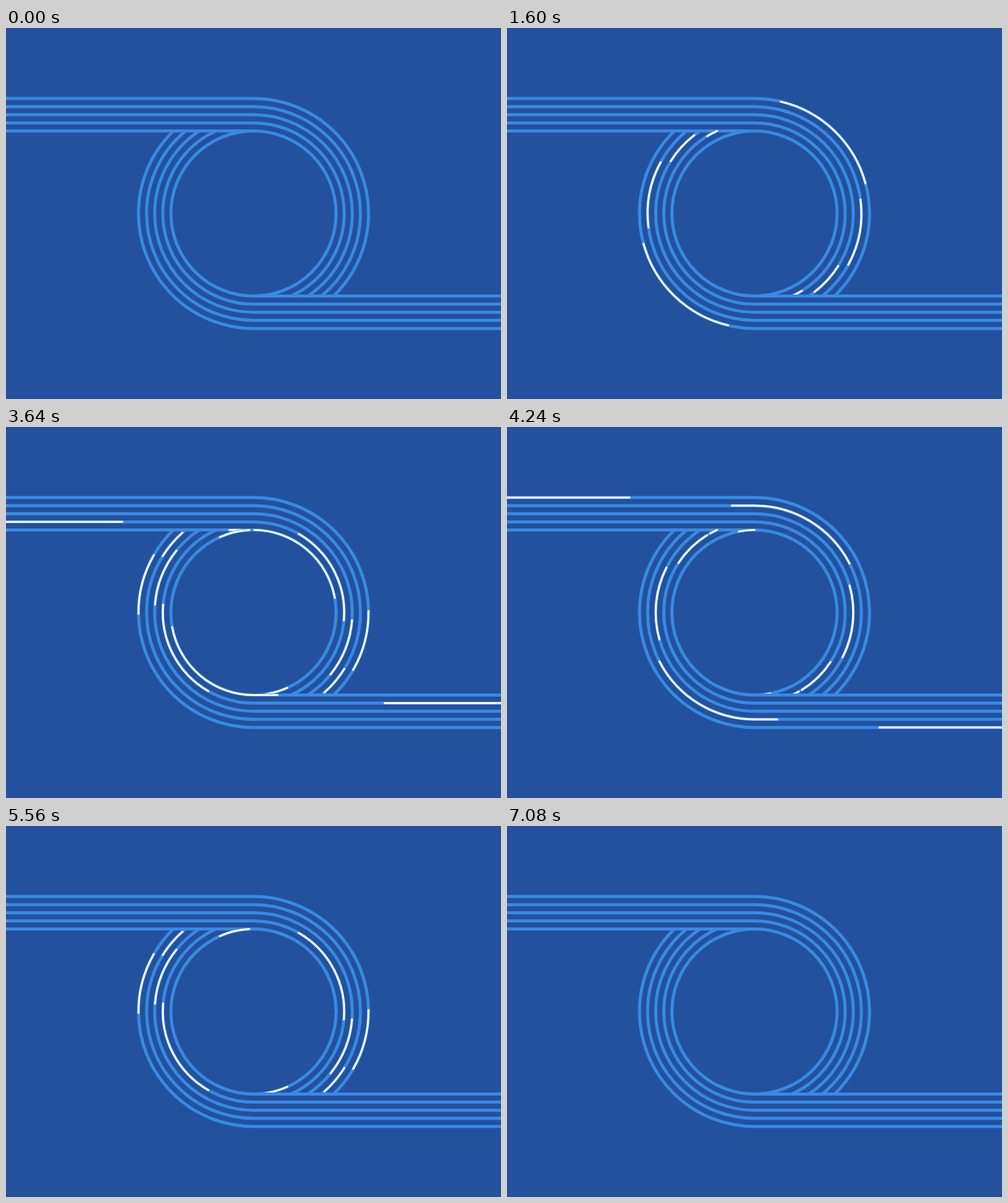
An HTML page with a canvas for the animation above (7.32 s loop, 800x600 px).

```html
<!DOCTYPE html>
<html lang="en">
<head>
<meta charset="utf-8">
<title>Looping lanes</title>
<style>
html, body { margin: 0; width: 100%; height: 100%; overflow: hidden; background: #24519e; }
canvas { display: block; }
</style>
</head>
<body>
<canvas id="stage" width="800" height="600"></canvas>
<script>
const ctx = document.getElementById('stage').getContext('2d');
const LOOP = 7320, STEP = 40, LAST = 177;
const CX = 400, CY = 300, INNER = 133.5, GAP = 13.1;

// Lanes from the inside out: a straight run, then an arc that stops at the opposite inner line.
const lanes = [0, 1, 2, 3, 4].map(i => {
  const r = INNER + GAP * i;
  return { r, len: CX + r * (Math.PI / 2 + Math.asin(INNER / r)) };
});

// Each wave sends one streak down every lane, offset in steps.
const stair = [-20, -15, -10, -5, 0];
const zigzag = [0, -5, 0, -5, 0];
const fork = [-5, 5, 0, -5, 0];
const waves = [
  [11, zigzag], [38, stair], [59, zigzag], [83, fork],
  [110, stair], [131, fork], [155, zigzag]
];

const curve = (p, a, b) => 3 * a * p * (1 - p) ** 2 + 3 * b * p * p * (1 - p) + p ** 3;

function ease(x) {
  if (x <= 0) return 0;
  if (x >= 1) return 1;
  let lo = 0, hi = 1;
  for (let i = 0; i < 30; i++) {
    const mid = (lo + hi) / 2;
    if (curve(mid, 0.1, 0.03) < x) lo = mid; else hi = mid;
  }
  return curve(lo, 0, 1);
}

function strokeLane(lane, from, to) {
  const { r } = lane;
  const angle = s => (s - CX) / r - Math.PI / 2;
  ctx.beginPath();
  if (from < CX) {
    ctx.moveTo(from - CX, -r);
    ctx.lineTo(Math.min(to, CX) - CX, -r);
  }
  if (to > CX) ctx.arc(0, 0, r, angle(Math.max(from, CX)), angle(to));
  ctx.stroke();
}

function drawHalf(frame) {
  ctx.lineCap = 'butt';
  ctx.lineWidth = 5;
  ctx.strokeStyle = '#388ae2';
  for (const lane of lanes) strokeLane(lane, 0, lane.len);

  ctx.lineCap = 'round';
  ctx.lineWidth = 3.2;
  ctx.strokeStyle = '#fff';
  for (const [start, shifts] of waves) {
    lanes.forEach((lane, i) => {
      const n = frame - start - shifts[i];
      const head = ease((n + 5.8) / 22) * lane.len;
      const tail = ease((n + 2.85) / 26) * lane.len;
      if (head - tail > 1) strokeLane(lane, tail, head);
    });
  }
}

function draw(now) {
  const frame = Math.min(LAST, Math.floor((now % LOOP) / STEP));
  ctx.setTransform(1, 0, 0, 1, 0, 0);
  ctx.fillStyle = '#24519e';
  ctx.fillRect(0, 0, 800, 600);
  for (const side of [1, -1]) {
    ctx.setTransform(side, 0, 0, side, CX, CY);
    drawHalf(frame);
  }
}

let origin = null;
function tick(now) {
  if (origin === null) origin = now;
  draw(now - origin);
  requestAnimationFrame(tick);
}
draw(0);
requestAnimationFrame(tick);
</script>
</body>
</html>
```
